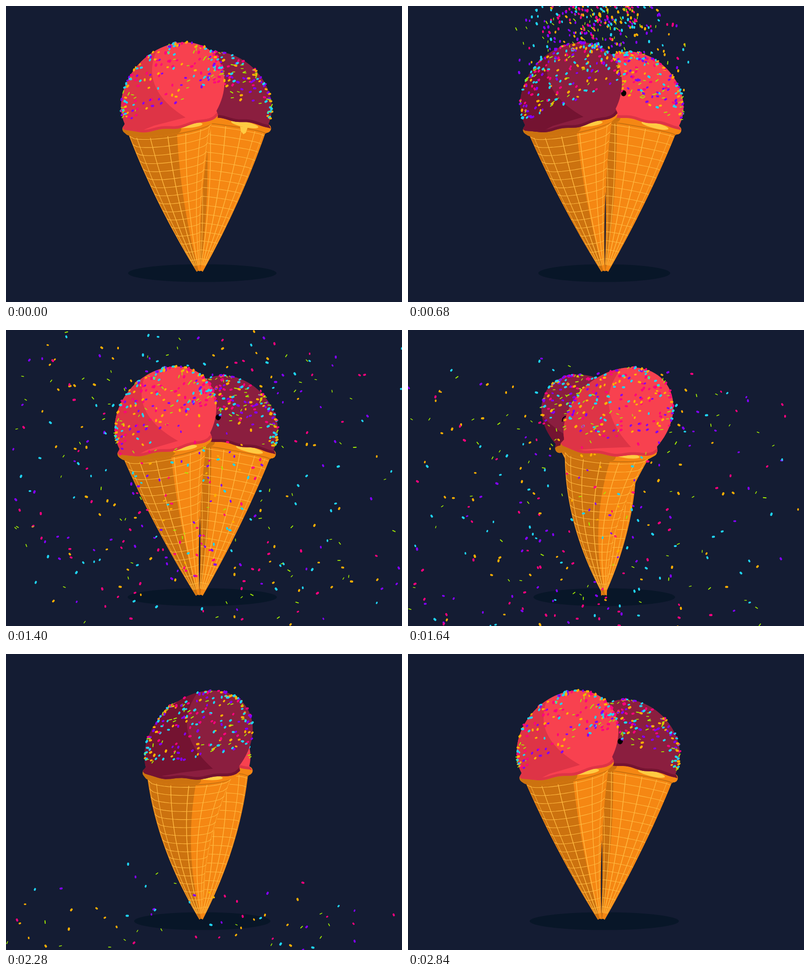
Animation of 800x600 px, one loop 2.88 s. Source, as an HTML page with a canvas:

```html
<!DOCTYPE html>
<html lang="en">
<head>
<meta charset="utf-8">
<title>Ice cream cones</title>
<style>
  html, body { margin: 0; width: 100%; height: 100%; overflow: hidden; background: #141c33; }
  canvas { display: block; width: 800px; height: 600px; }
</style>
</head>
<body>
<canvas id="stage" width="800" height="600"></canvas>
<script>
const ctx = document.getElementById('stage').getContext('2d');
const LOOP = 2880, TURN = 1440, FRAME = 40, TAU = Math.PI * 2, DEG = Math.PI / 180;
const ORANGE = '#f58713', ORANGE_SHADE = '#cc720f', GRID = '#ffb83f', YELLOW = '#ffcb42';
const SPRINKLES = ['#1fd5f5', '#ffb000', '#ff007f', '#8400ff', '#a4f000'];
const FLAVOURS = {
  pink: { base: '#f8414f', shade: '#de3446', orbit: 11, turn: 0 },
  berry: { base: '#8b1e3f', shade: '#741331', orbit: 0, turn: Math.PI }
};

let seed = 7;
function random() {
  seed = (seed * 16807) % 2147483647;
  return seed / 2147483647;
}
const spread = () => random() + random() + random() - 1.5;
const range = (from, to, steps, fn) =>
  Array.from({ length: steps + 1 }, (_, i) => fn(from + (to - from) * i / steps));
const arch = u => Math.sqrt(Math.max(0, 1 - u * u));

function trace(points) {
  ctx.beginPath();
  points.forEach(p => ctx.lineTo(p[0], p[1]));
}
function fill(points, color) {
  trace(points);
  ctx.fillStyle = color;
  ctx.fill();
}
function stroke(points, color, width) {
  trace(points);
  ctx.strokeStyle = color;
  ctx.lineWidth = width;
  ctx.stroke();
}
function ellipse(x, y, rx, ry, angle, color) {
  ctx.beginPath();
  ctx.ellipse(x, y, rx, ry, angle, 0, TAU);
  ctx.fillStyle = color;
  ctx.fill();
}
function sprinkle(x, y, kind, angle, size) {
  const half = (kind === 4 ? 2.5 : 1.2) * size;
  const dx = Math.cos(angle) * half, dy = Math.sin(angle) * half;
  stroke([[x - dx, y - dy], [x + dx, y + dy]], SPRINKLES[kind], (kind === 4 ? 1.8 : 4) * size);
}

// Sprinkles on a scoop: height, longitude and look; the face is kept clear.
function makeTopping() {
  return Array.from({ length: 370 }, () => {
    const lon = random() * TAU;
    const lowest = 0.12 - 0.25 * Math.cos(lon - 140 * DEG);
    return {
      lon, y: -1 + random() * (1 + lowest),
      kind: Math.floor(random() * 5), angle: -0.5 + spread() * 0.9, size: 0.8 + random() * 0.35
    };
  });
}
for (const name in FLAVOURS) FLAVOURS[name].topping = makeTopping();

// Sprinkles that rain down, hit the scoops and burst away.
const shower = Array.from({ length: 460 }, () => {
  const x = 392 + spread() * 140;
  return {
    x, y: 82 + (x - 395) ** 2 * 0.002 + random() * 60,
    hit: 655 + 300 * Math.sqrt(random()), fall: 0.5 + random() * 0.12,
    vx: spread() * 1.35 + (x - 395) * 0.002, vy: -0.7 + random() * 2,
    kind: Math.floor(random() * 5), angle: random() * 3, spin: (random() - 0.5) * 0.012,
    size: 0.75 + random() * 0.35
  };
});

function makePose(theta, orbit) {
  const sin = Math.sin(theta), cos = Math.cos(theta), sin2 = 2 * sin * cos;
  const tilt = Math.atan(94 * Math.sin(theta - 3 * DEG) / 356);
  const r = 99 + 7 * cos;
  const reach = (355 + 2 * cos - 3.5 * sin) / Math.cos(tilt);
  const rim = reach - 0.6 * r, lean = 0.27 * cos, sag = 5 + 11 * cos;
  const apexX = 394 + orbit * sin, bulge = 4 + 2 * sin2;

  // Rotates about the tip, then bends sideways against the travel.
  function place(x, h) {
    const q = h / rim;
    const bend = q < 1 ? -0.6 * r * lean * (q + bulge * q * (1 - q)) : lean * (h - reach);
    return [apexX + x * Math.cos(tilt) + h * Math.sin(tilt) + bend,
            537 + x * Math.sin(tilt) - h * Math.cos(tilt)];
  }
  return {
    theta, sin, cos, sin2, tilt, r, sag, lean,
    cone: (u, q) => place(u * (0.82 * r * q + 3 * (1 - q)), rim * q - sag * q * arch(u)),
    scoop: (x, y) => place(x * r, reach - y * r)
  };
}

function drawCone(pose) {
  const { theta, sin, cos, sin2, cone, scoop, r, sag } = pose;
  const edge = -0.2 + 0.36 * cos - 0.13 * sin + 0.03 * sin2;
  const side = (u, from, to) => range(from, to, 24, q => cone(u, q));
  const ring = (q, from = -1, to = 1) => range(from, to, 20, u => cone(u, q));
  const part = (from, to) => [...side(from, 0, 1), ...ring(1, from, to), ...side(to, 1, 0)];

  const body = part(-1, 1);
  fill(body, ORANGE);
  stroke(body, ORANGE, 2);
  fill(part(-1, edge), ORANGE_SHADE);
  stroke(ring(0.985, edge, 1), ORANGE_SHADE, 6);

  for (let i = 1; i < 17; i++) stroke(ring(1.02 - i / 17), GRID, 1.1);
  for (let i = 0; i < 14; i++) {
    const a = theta + i * TAU / 14;
    if (Math.cos(a) > 0.05) stroke(side(Math.sin(a), 0.04, 0.97), GRID, 0.5 + Math.cos(a));
  }

  const lip = (from, to) => range(from, to, 20, u => scoop(u * 0.84, 0.56 + sag / r * arch(u)));
  stroke(lip(-1, 1), ORANGE, 18);
  stroke(lip(-1, edge), ORANGE_SHADE, 18);
  if (theta > 145 * DEG && theta < 225 * DEG) {
    fill([scoop(0.25, 0.6), scoop(0.42, 0.6), scoop(0.39, 0.72), scoop(0.34, 0.76), scoop(0.28, 0.7)], YELLOW);
  }
}

function drawFace({ theta, scoop, tilt }) {
  const keys = [[90, -120], [140, -36], [220, -5], [270, 46], [320, 110]];
  const deg = theta / DEG;
  const i = keys.findIndex(k => deg < k[0]);
  if (i < 1) return;
  const [a, b] = [keys[i - 1], keys[i]];
  const yaw = a[1] + (b[1] - a[1]) * (deg - a[0]) / (b[0] - a[0]);
  const asleep = deg > 185 && deg < 240;

  function feature(offset, y, draw) {
    const angle = (yaw + offset) * DEG;
    if (Math.cos(angle) < 0.1) return;
    ctx.save();
    ctx.translate(...scoop(Math.sin(angle), y));
    ctx.rotate(tilt);
    ctx.scale(Math.max(0.3, Math.cos(angle)), 1);
    draw();
    ctx.restore();
  }
  function eye() {
    if (!asleep) return ellipse(0, 0, 5.5, 6, 0, '#000');
    ctx.beginPath();
    ctx.ellipse(0, 2, 8, 9, 0, Math.PI, TAU);
    ctx.strokeStyle = '#000';
    ctx.lineWidth = 2;
    ctx.stroke();
  }
  feature(-18, -0.04, eye);
  feature(18, -0.04, eye);
  feature(0, 0.03, () => {
    ctx.beginPath();
    ctx.ellipse(0, -3, 10.5, 10, 0, 0, Math.PI);
    ctx.fillStyle = '#000';
    ctx.fill();
  });
}

function drawScoop(pose, flavour) {
  const { theta, sin, cos, sin2, tilt, r, sag, lean, scoop } = pose;
  const bottom = range(-1, 1, 36, u =>
    scoop(u * 0.93, 0.54 + 0.018 * Math.sin(u * 9) + sag / r * arch(u)));
  const outline = [...range(27 * DEG, -207 * DEG, 60, a => scoop(Math.cos(a), Math.sin(a))), ...bottom];

  const [hx, hy] = scoop(0.36, 0.56 - 0.03 * cos + sag / r * 0.9);
  ellipse(hx, hy, 28, 5.5, tilt + 0.06, YELLOW);
  fill(outline, flavour.base);

  ctx.save();
  trace(outline);
  ctx.clip();
  const tip = -0.1 + 0.5 * cos - 0.27 * sin + 0.2 * sin2;
  fill([
    ...range(-1.1, 0.5, 24, y => scoop(tip - 0.75 + 0.75 * ((y + 0.6) / 1.1) ** 2, y)),
    scoop(tip - 0.6, 0.57), scoop(-0.5, 0.62), scoop(-1.3, 0.7), scoop(-1.3, -1.1)
  ], flavour.shade);
  stroke(bottom, flavour.shade, 11);
  ctx.restore();

  drawFace(pose);
  for (const s of flavour.topping) {
    const ring = Math.sqrt(1 - s.y * s.y), a = s.lon + theta;
    if (ring * Math.cos(a) < -0.04) continue;
    const [x, y] = scoop(ring * Math.sin(a), s.y);
    sprinkle(x, y, s.kind, s.angle + tilt - lean * 0.4, s.size);
  }
}

function drawShower(time) {
  for (const p of shower) {
    const dt = time - p.hit;
    let { x, y, angle } = p;
    if (dt < 0) {
      y += dt * p.fall;
      angle = 1.2 + Math.sin(p.angle * 5) * 0.5;
    } else {
      const travel = 350 * (1 - Math.exp(-dt / 350));
      x += p.vx * travel;
      y += p.vy * travel + 0.0003 * dt * dt;
      angle += p.spin * dt;
    }
    if (x > -10 && x < 810 && y > -10 && y < 610) sprinkle(x, y, p.kind, angle, p.size);
  }
}

function draw(time) {
  ctx.fillStyle = '#141c33';
  ctx.fillRect(0, 0, 800, 600);
  ctx.lineCap = ctx.lineJoin = 'round';

  const turn = time / TURN * TAU;
  ellipse(396.5, 541.5, 142 + 9.5 * Math.cos(turn - 327 * DEG), 18, 0, '#081628');

  Object.values(FLAVOURS)
    .map(flavour => {
      const theta = (turn - 30 * DEG + flavour.turn + TAU) % TAU;
      return { flavour, pose: makePose(theta, flavour.orbit) };
    })
    .sort((a, b) => a.pose.cos - b.pose.cos)
    .forEach(({ flavour, pose }) => {
      drawCone(pose);
      drawScoop(pose, flavour);
    });
  drawShower(time);
}

function tick() {
  draw(Math.floor(performance.now() / FRAME) * FRAME % LOOP);
  requestAnimationFrame(tick);
}
tick();
</script>
</body>
</html>
```
